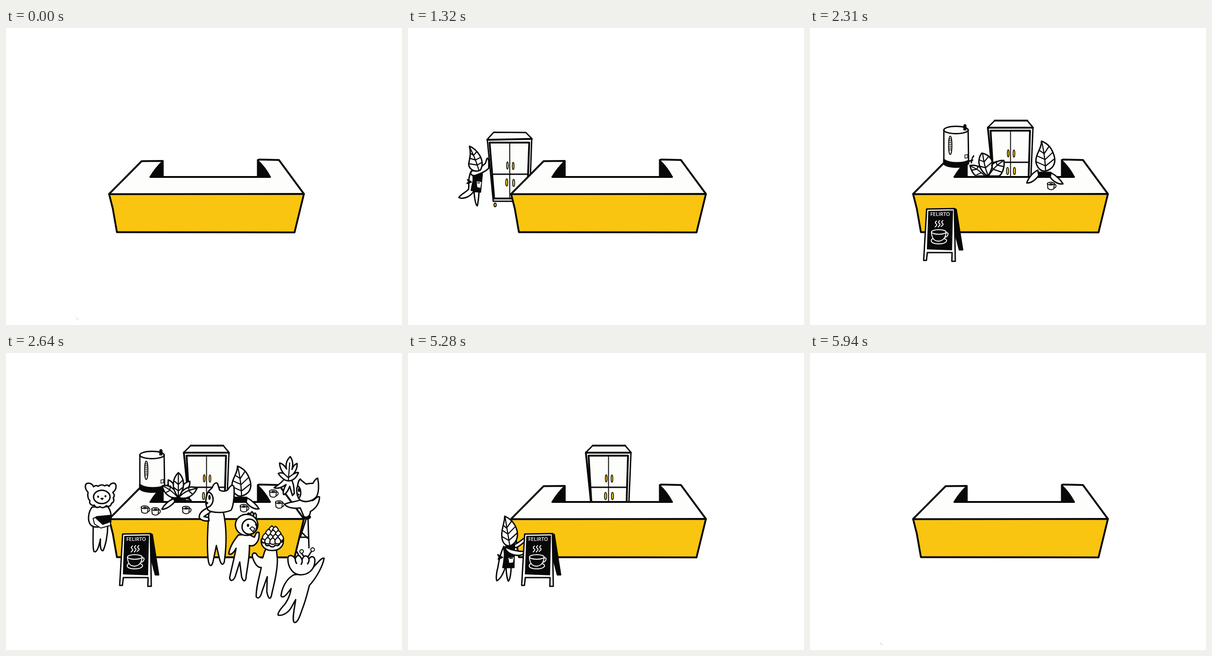
Recreate the animation shown at these times as an HTML page. Size 864 by 648 pixels, loop 6930 ms.

```html
<!DOCTYPE html>
<html lang="en">
<head>
<meta charset="utf-8">
<title>Café counter</title>
<style>
html, body { margin: 0; width: 100%; height: 100%; overflow: hidden; background: #fff; }
svg { display: block; width: 100vw; height: 100vh; fill: #fdfdfb; stroke: #080808; stroke-width: 3; stroke-linejoin: round; stroke-linecap: round; }
.n { fill: none; }
.k { fill: #080808; }
.y { fill: #f9c510; }
.thick { stroke-width: 4; }
.thin { stroke-width: 2; }
.vein { fill: none; stroke-width: 2.4; }
.grip { fill: #f9c510; stroke-width: 1.6; }
.chalk { stroke: #fff; stroke-width: 2; fill: none; }
text { font: 600 11px "Open Sans", "Noto Sans", sans-serif; fill: #fff; stroke: none; }

/* The loop has 21 beats of 330 ms; every change is a hard cut. */
.layer { visibility: hidden; animation: 6930ms step-end infinite; }
.speck { animation-name: speck; }
.push { animation-name: push; }
.around { animation-name: around; }
.cabinet { animation-name: cabinet; }
.setter { animation-name: setter; }
.sign { animation-name: sign; }
.barista { animation-name: barista; }
.bring { animation-name: bring; }
.urn { animation-name: urn; }
.rest { animation-name: rest; }
.crowd { animation-name: crowd; }
.remove { animation-name: remove; }
.leave { animation-name: leave; }
@keyframes speck { 0%, 85.7143% { visibility: visible } 14.2857% { visibility: hidden } 100% { visibility: visible } }
@keyframes push { 0%, 19.0476% { visibility: hidden } 14.2857% { visibility: visible } }
@keyframes around { 0%, 23.8095% { visibility: hidden } 19.0476% { visibility: visible } }
@keyframes cabinet { 0%, 80.9524% { visibility: hidden } 23.8095% { visibility: visible } }
@keyframes setter { 0%, 28.5714%, 80.9524% { visibility: hidden } 23.8095%, 76.1905% { visibility: visible } }
@keyframes sign { 0%, 28.5714%, 71.4286%, 80.9524% { visibility: hidden } 23.8095%, 33.3333%, 76.1905% { visibility: visible } }
@keyframes barista { 0%, 76.1905% { visibility: hidden } 28.5714% { visibility: visible } }
@keyframes bring { 0%, 33.3333% { visibility: hidden } 28.5714% { visibility: visible } }
@keyframes urn { 0%, 71.4286% { visibility: hidden } 33.3333% { visibility: visible } }
@keyframes rest { 0%, 38.0952%, 71.4286% { visibility: hidden } 33.3333%, 66.6667% { visibility: visible } }
@keyframes crowd { 0%, 66.6667% { visibility: hidden } 38.0952% { visibility: visible } }
@keyframes remove { 0%, 76.1905% { visibility: hidden } 71.4286% { visibility: visible } }
@keyframes leave { 0%, 85.7143% { visibility: hidden } 80.9524% { visibility: visible } }
</style>
</head>
<body>
<svg viewBox="0 0 864 648">
<defs>
  <g id="cart">
    <path d="M580 434L593 421L663 420.500L677 436L664 571L585 571Z"/>
    <path class="thick n" d="M580 435L677 437M585.500 443L672 443L662 565L590 565Z"/>
    <path class="n" d="M588 512H666"/>
    <path class="n thin" d="M628 443V565"/>
    <g class="grip">
      <ellipse cx="620.500" cy="494" rx="2" ry="8"/><ellipse cx="633" cy="493" rx="2" ry="8"/>
      <ellipse cx="619.500" cy="531" rx="2.300" ry="8"/><ellipse cx="634.500" cy="530" rx="2.300" ry="8"/>
    </g>
    <g class="y thin"><ellipse cx="590" cy="579" rx="3" ry="4"/><ellipse cx="660" cy="579" rx="2.500" ry="4"/></g>
  </g>
  <g id="pusher">
    <path d="M695 550C696 565 697 576 699 581C703 578 705 562 706 550ZM708 512L712 505C720 520 716 533 718 545C726 553 735 556 739 563C730 567 715 562 707 550Z"/>
    <path class="k" d="M688 510L705 513L712 547L692 551Z"/>
    <path d="M674 499C673 486 674 477 677 477C680 480 679 488 683 490C692 499 704 501 712 506C716 513 708 517 701 514C692 510 682 508 674 499Z"/>
    <path class="k" d="M712 529L720 524L717 529L721 532Z"/>
    <path stroke="none" d="M690 529L700 528L699 540L692 542Z"/><path class="n thin" d="M694 531L698 531"/>
    <path d="M716 451C700 456 680 482 692 503C706 510 720 499 717 486C713 472 713 462 716 451Z"/>
    <path class="vein" d="M715 454Q704 475 695 504M707 471L701 464M703 481L693 476M699 492L690 487M707 471L714 466M703 481L716 477M699 492L718 489"/>
  </g>
  <g id="helper">
    <path d="M209 422C203 434 199 448 196 468C192 482 192 494 194 497C203 492 208 480 213 466ZM214 466C214 482 217 495 219 498C223 494 225 478 225 466Z"/>
    <path class="k" d="M214 421L232 419L231 468L207 468C211 450 209 440 214 421Z"/>
    <path d="M232 418C242 414 248 407 255 403L256 411C248 416 242 424 233 425ZM212 423C220 428 236 433 252 433C255 439 246 443 234 441C222 439 212 432 212 423Z"/>
    <path class="k" d="M196 440L206 446L197 450L199 445Z"/>
    <path stroke="none" d="M219 447L231 446L229 457L221 458Z"/><path class="n thin" d="M222 448L228 448"/>
    <path d="M211 356C211 372 202 386 205 404C207 416 214 421 222 421C236 416 241 402 238 388C234 372 224 362 211 356Z"/>
    <path class="vein" d="M212 359Q217 390 222 420M215 382L208 376M218 395L206 387M220 409L206 401M215 382L226 367M218 395L235 378M220 409L239 392"/>
  </g>
  <g id="board">
    <path class="k" d="M315 394L319 396L333 484L326 484L316 446Z"/>
    <path d="M254.500 395L315 394L317 509L309.500 509L310 490L256 490L254 507L248 507Z"/>
    <path class="k thin" d="M259 400L311 399L309 484L256 482Z"/>
    <text x="284" y="409.500" text-anchor="middle">FELIRTO</text>
    <path class="chalk" d="M276 421q-5 4 0 7q2 2-3 6M283 420q-5 4 0 7q2 2-3 7M290 420q-5 4 0 7q2 2-4 6M265 446C266 461 272 465 281 465C291 464 296 457 297 446M297 447C304 445 302 455 294 457M268 459C260 465 266 471 281 471C298 471 302 463 294 460"/>
    <ellipse class="chalk" cx="281" cy="445" rx="16" ry="5"/>
  </g>
  <g id="kettle">
    <path d="M292 222L292 292C300 304 336 304 346 292L345 222Z"/>
    <path class="k" d="M292 287C304 296 332 296 346 289L346 296C336 306 302 306 292 297Z"/>
    <ellipse cx="318.500" cy="222.500" rx="26.500" ry="8"/>
    <path class="k" d="M336 213Q338 209 340 213L340 222L336 222Z"/>
    <ellipse class="thin" cx="306" cy="256" rx="3.600" ry="20"/>
    <path class="n" stroke-width="1.500" d="M304 242h4m-4 4h4m-4 4h4m-4 4h4m-4 4h4m-4 4h4m-4 4h4M338 277L344 276L344 283L338 284Z"/>
    <path class="n" d="M346 291L355 288M353 287L352 294M354 284L357 279"/>
  </g>
  <g id="fan">
    <path d="M354 277C362 279 371 290 376 315C381 290 391 281 401 280C402 294 393 308 376 315C360 308 352 292 354 277Z"/>
    <path d="M341 290C355 286 370 296 376 315C360 319 345 309 341 290ZM417 295C402 288 384 295 376 315C392 321 409 313 417 295Z"/>
    <path d="M376 261C365 272 358 292 376 315C393 294 389 272 376 261Z"/>
    <path class="vein" d="M376 265V315M376 287L368 280M376 287L385 278M376 301L367 294M376 301L386 293M344 291Q361 299 375 315M414 296Q392 299 378 314M357 300L359 290M357 300L350 304M400 302L398 292M400 302L407 308"/>
  </g>
  <g id="carrier">
    <path d="M738 515C734 535 727 570 731 588C737 594 743 570 748 552C752 570 758 594 764 588C766 565 763 535 760 515Z"/>
    <path class="k" d="M736 516L761 516L763 549L735 549Z"/>
    <use href="#kettle" transform="translate(375 235)"/>
    <path d="M738 518C724 520 713 518 704 523C706 533 726 534 740 530Z"/>
    <use href="#fan" transform="translate(370 199)"/>
  </g>
  <g id="cup">
    <path class="thin" d="M6-4C13-6 12 6 5 4"/>
    <path class="thin" d="M-8-6L-7 5Q-1 10 6 6L7-6Z"/>
    <ellipse class="thin" cx="-.5" cy="-5.500" rx="7.500" ry="3"/><ellipse class="k" cx="0" cy="-5" rx="3.500" ry="1" stroke-width="1"/>
  </g>
  <path id="scale" d="M0-9C6-5 8 0 5 4Q0 7-5 4C-8 0-6-5 0-9Z"/>
</defs>

<g class="layer cabinet">
  <path d="M388 217L403 202L474 202L486.500 217L482 325L399 325Z"/>
  <path class="n thick" d="M388 217.500H486.500M403 202H474M388 217L399 324M400 325L394 224H480L477 325"/>
  <path class="n" d="M401 293H478"/><path class="n thin" d="M437.500 224V325"/>
  <g class="grip">
    <ellipse cx="432.500" cy="273.500" rx="2" ry="8"/><ellipse cx="445" cy="274" rx="2" ry="8"/>
    <ellipse cx="431" cy="312" rx="2.400" ry="8"/><ellipse cx="446" cy="312" rx="2.400" ry="8"/>
  </g>
</g>
<g class="layer around" transform="translate(850 -193) scale(-1 1)"><use href="#cart"/><use href="#pusher"/></g>

<g class="thick">
  <path stroke="none" d="M225 362L296 290L342 290L314 325L577 325L551 287L595 288L650 362Z"/>
  <path class="k thin" d="M342 290Q326 305 314 325L343 325ZM549 288Q566 304 577 325L549 325Z"/>
  <path class="y" d="M225 362.500L650 362L629.500 446L242 445.500L233 394Z"/>
  <path class="n" d="M225 362L296 290.500L342 290V324M315 325L576 325M549.500 324V288L553 287L595.500 288L650 362"/>
</g>
<path class="layer speck n" stroke="#b9b8d6" stroke-width="1" d="M154 632Q154 636 158 637"/>

<g class="layer push"><use href="#cart"/><use href="#pusher"/></g>
<g class="layer urn"><use href="#kettle"/></g>

<g class="layer rest">
  <path d="M349 300C352 312 357 320 363 323L386 323C381 308 366 297 349 300Z"/>
  <path d="M423 289C409 288 393 297 389 310L388 323L413 323C421 316 425 302 423 289Z"/>
  <path d="M375 273C368 282 367 293 371 304C376 314 382 320 388 323C397 310 400 298 396 287C390 278 384 275 375 273Z"/>
  <path class="vein" d="M377 276Q380 300 388 321M380 292L370 288M383 305L372 302M380 292L390 280M383 305L397 293M352 302Q368 309 381 322M364 308L367 301M364 308L354 310M374 316L364 320M420 291Q402 302 390 322M408 299L406 291M408 299L421 302M399 308L396 299M399 308L417 314"/>
  <use href="#cup" x="526" y="345"/>
</g>

<g class="layer barista">
  <path class="k" d="M499 315L525 315L526 325L499 325Z"/>
  <path d="M497 310C485 316 476 328 473 338C483 339 492 331 499 322ZM526 316C538 322 548 333 552 340C542 342 529 334 524 325Z"/>
  <path d="M505 247C506 263 491 276 493 293C496 307 506 314 514 312C530 308 537 296 533 280C528 262 518 251 505 247Z"/>
  <path class="vein" d="M506 250Q513 280 514 311M511 274L502 268M513 287L495 279M514 301L494 292M511 274L521 259M513 287L530 271M514 301L534 285"/>
</g>

<g class="layer setter"><use href="#helper"/></g>
<g class="layer sign"><use href="#board"/></g>

<g class="layer crowd">
  <!-- server with the wide leaf -->
  <path class="k" d="M362 316L391 316L390 325L362 325Z"/>
  <path d="M367 318C354 321 344 333 340 341C350 341 361 333 368 325ZM390 318Q400 316 404 322L391 322Z"/>
  <use href="#fan"/>

  <!-- guest behind the right arm of the counter -->
  <path d="M607 275C600 285 590 290 585 294C594 297 604 292 611 287C606 296 603 306 606 309C613 306 616 298 619 291L625 311L629 306C628 294 628 284 622 275Z"/>
  <path d="M620 226C611 235 610 245 612 253C608 246 603 241 597 240C597 250 601 257 606 263C601 261 597 261 594 263C600 272 609 279 616 279C626 279 634 272 638 261C633 260 630 262 627 264C633 257 636 249 635 241C629 243 626 248 624 254C627 243 626 234 620 226Z"/>
  <path class="vein" d="M619 240L616 278M616 272L606 263M616 272L627 264"/>

  <g><use href="#cup" x="303" y="342"/><use href="#cup" x="326" y="346"/><use href="#cup" x="393" y="343"/>
  <use href="#cup" x="519" y="339"/><use href="#cup" x="583" y="307"/><use href="#cup" x="596" y="331"/></g>

  <!-- guest on the stool -->
  <path class="n" d="M655 362L642 402M659 362L661 425M645 391L658 404M642 402H660"/>
  <ellipse class="k" cx="656" cy="358" rx="8" ry="4"/>
  <path d="M646 319C632 326 618 324 608 330C613 338 630 340 642 338L650 357C658 361 664 354 664 346C674 340 684 330 684 314C679 311 675 320 668 322Z"/>
  <path d="M642 275C645 279 651 283 655 286C662 284 667 285 670 284C673 278 677 274 680 273C683 286 683 305 677 314C667 325 650 327 641 320C634 313 633 296 636 291C637 284 638 278 642 275Z"/>
  <path class="n" d="M637 290C645 297 645 312 638 317"/><ellipse class="k" cx="639" cy="299" rx=".7" ry="3"/><path class="k" d="M635 307L639 309L636 311Z"/>

  <!-- guest with the tray -->
  <path d="M190 372C191 395 188 425 192 433C198 437 203 422 206 406C205 424 207 433 212 431C217 420 222 398 222 376Z"/>
  <path d="M188 336C180 346 177 364 184 374C192 384 210 380 226 370C233 358 228 343 222 335Z"/>
  <path class="k thin" d="M197 357L228 354L229 369L212 374L194 361Z"/>
  <path class="thin" d="M190 361L195 359L211 374L228 368L228 376L207 382L193 373Z"/>
  <path d="M179 304C170 294 172 284 180 284C186 284 190 288 191 292C195 288 199 289 201 291C205 287 212 287 215 290C219 287 223 288 225 291C228 283 238 281 240 289C241 297 236 302 233 304C237 309 237 313 234 316C237 322 234 327 230 328C229 335 223 336 219 333C214 339 208 338 205 335C199 339 194 336 193 332C186 334 181 328 183 322C178 318 178 309 179 304Z"/>
  <ellipse cx="209" cy="314" rx="18" ry="14.500"/>
  <path class="n thick" d="M201 313v1M217 312v1"/><path class="k thin" d="M207 317L212 317L210 320Z"/>

  <!-- queue, front to back -->
  <path d="M443 345C440 380 438 420 441 450C443 467 449 468 452 454L459 420L466 450C470 465 476 464 477 450C481 420 482 380 474 346Z"/>
  <path d="M440 338C428 343 420 351 422 360C428 367 437 367 443 366L442 359L432 357L446 347Z"/>
  <path d="M441 303C444 297 449 298 451 291C454 284 460 281 462 286L466 299C472 303 482 302 485 297C489 290 494 286 497 291C499 304 497 334 491 343C477 350 450 349 441 343C434 331 434 318 441 303Z"/>
  <path class="n" d="M442 303C456 309 455 332 440 337"/><ellipse class="k" cx="444" cy="315" rx="1" ry="4"/><path class="k" d="M436 325L440 327L437 330Z"/>

  <path d="M507 397C498 408 488 422 486 438C490 442 497 436 502 426C498 448 491 474 488 490C489 500 496 497 500 488L510 456L514 488C518 502 524 498 524 486C528 460 532 440 531 420C543 424 554 410 552 392C546 388 544 397 542 402L530 396Z"/>
  <path d="M528 358C525 348 531 346 534 355C533 343 540 344 540 356C541 346 547 347 546 360Z"/>
  <ellipse cx="525" cy="375" rx="24.500" ry="23"/>
  <ellipse cx="531" cy="379" rx="16" ry="16.500"/>
  <ellipse class="k" cx="528" cy="376" rx="1" ry="2"/><path class="k" d="M545 373v2"/><path class="thin" d="M532 383L537 379L543 383L539 390Z"/>

  <path d="M567 428C563 434 562 442 560 447C553 447 548 443 546 438C540 434 536 438 538 446C542 459 549 469 557 468C552 490 545 515 546 532C550 538 556 532 558 522L570 488L569 520C572 538 578 540 580 525C586 500 593 470 592 448L590 430Z"/>
  <path d="M557 407C555 421 565 431 581 431C597 431 607 421 605 406Z"/>
  <path d="M558 405C556 413 561 416 565 413Q567 424 574 419Q581 427 588 419Q596 423 598 413C606 413 606 407 603 402Z"/>
  <g class="vein" style="fill:#fdfdfb">
    <use href="#scale" x="580" y="386"/><use href="#scale" x="588" y="387"/>
    <use href="#scale" x="573" y="393"/><use href="#scale" x="583" y="395"/><use href="#scale" x="594" y="396"/>
    <use href="#scale" x="566" y="402"/><use href="#scale" x="577" y="404"/><use href="#scale" x="588" y="404"/><use href="#scale" x="599" y="404"/>
    <use href="#scale" x="571" y="411"/><use href="#scale" x="582" y="412"/><use href="#scale" x="593" y="411"/>
  </g>

  <path d="M628 484C612 492 602 512 600 530C605 538 614 524 622 514C620 530 612 545 604 553C596 562 592 570 594 572C604 574 616 566 622 556L632 538C630 555 624 578 628 587C635 592 641 575 646 560C654 540 658 522 662 507C676 492 691 466 694 448C689 444 676 463 659 480Z"/>
  <path class="n" d="M642 449L635 434M653 448L644 436M658 446L667 432"/>
  <circle class="thin" cx="645" cy="433" r="4"/><circle class="thin" cx="669" cy="429" r="4"/>
  <path d="M615 449C615 440 624 439 631 449C636 438 641 440 646 451C649 442 656 439 661 449C666 442 673 443 674 452C674 472 660 484 643 484C627 484 615 469 615 449Z"/>
  <path class="n" d="M631 449Q631 455 634 459M646 451Q647 457 644 461M661 449Q662 455 658 460"/>
</g>

<g class="layer bring"><use href="#carrier"/></g>
<g class="layer remove" transform="translate(-66 21)"><use href="#carrier"/></g>
<g class="layer leave">
  <use href="#helper" transform="translate(-140 -46)"/>
  <use href="#board" transform="translate(-128 -50) rotate(8 290 452)"/>
</g>
</svg>
</body>
</html>
```
